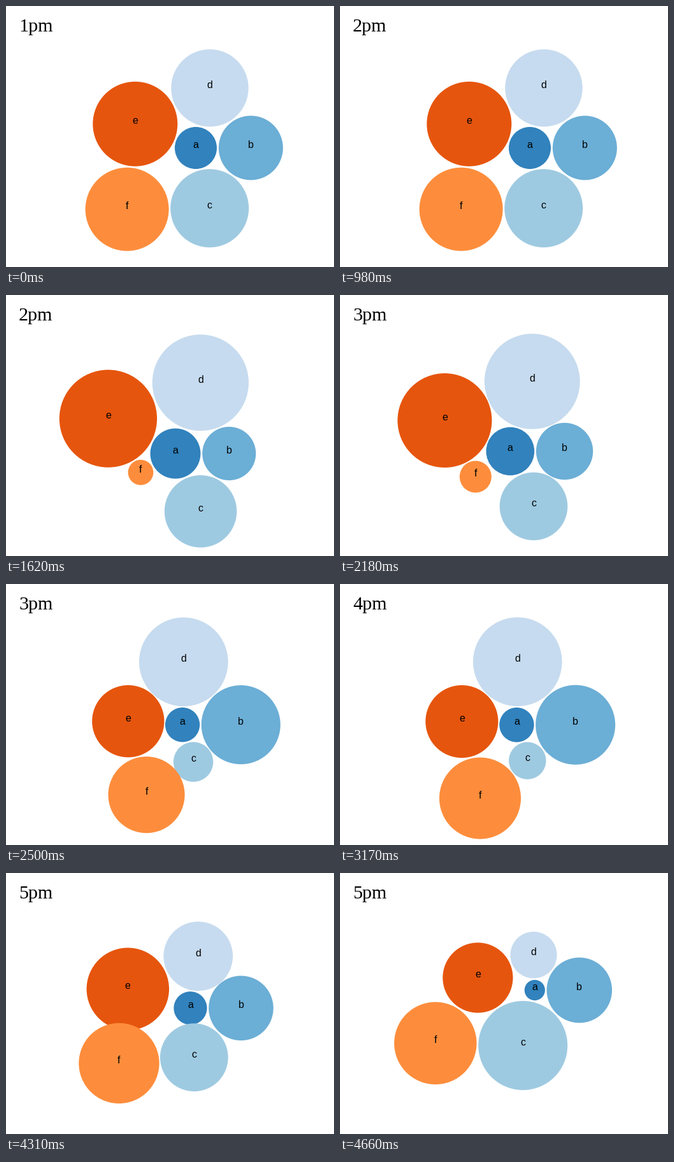
Write a matplotlib script that moves like this. It is 515 px wide and 410 px high and loops after 5330 ms.

```python
import matplotlib.pyplot as plt
from matplotlib.animation import FuncAnimation
from matplotlib.patches import Circle

W, H, DPI = 515, 410, 64
LOOP, TICK = 5330, 10       # ms
EASE_MS, LEAD_MS = 750, 33  # tween length, time already run at its first step
STEPS = 28

NAMES = "abcdef"
COLORS = ["#3182bd", "#6baed6", "#9ecae1", "#c6dbef", "#e6550d", "#fd8d3c"]
HOURS = ["1pm", "2pm", "3pm", "4pm", "5pm"]

# (x, y, radius) of every bubble, hour by hour
LAYOUTS = [
    [(298, 223, 33), (384.4, 222.9, 50.5), (319.7, 317.7, 61.5),
     (320, 128.8, 60.7), (202.8, 185.3, 66.5), (190.1, 319.3, 65.5)],
    [(265.8, 249.2, 39.5), (350.1, 249.2, 42), (305.5, 340, 56.7),
     (305.3, 137.8, 75.7), (160.2, 194.2, 76.7), (211.6, 278.5, 19.6)],
    [(278.3, 218.1, 25.8), (370.8, 218.1, 64.2), (292.9, 273, 28.5),
     (276, 120.7, 69.2), (195.2, 217.9, 54.5), (221.5, 336.8, 64.4)],
    [(271, 244.3, 37.4), (361.3, 244.2, 50.2), (304.6, 310.8, 34.5),
     (299.2, 133, 74.5), (162.8, 202.3, 75.7), (208.8, 334.6, 61.4)],
    [(305.8, 184, 16.1), (375.8, 184.1, 51.3), (287.2, 271, 70),
     (304, 128.8, 36.6), (216.4, 164.5, 55.1), (149.8, 267.4, 64.7)],
]
# start and end of the move to each next hour, in ms
MOVES = [(980, 1690), (1980, 2680), (2970, 3670), (3960, 4660)]


def px(size):
    return size * 72 / DPI


def ease(u):
    return 4 * u**3 if u < 0.5 else 1 - 4 * (1 - u)**3


def state(t):
    """Hour index and progress towards its layout at time t."""
    for hour in range(len(MOVES), 0, -1):
        start, end = MOVES[hour - 1]
        if t >= start:
            step = (end - start) / STEPS
            k = int((t - start) / step + 1e-6)
            if k >= STEPS:
                return hour, 1
            return hour, ease((LEAD_MS + k * step) / EASE_MS)
    return 0, 1


fig = plt.figure(figsize=(W / DPI, H / DPI), dpi=DPI, facecolor="white")
ax = fig.add_axes([0, 0, 1, 1])
ax.set_xlim(0, W)
ax.set_ylim(H, 0)
ax.axis("off")

title = ax.text(20, 40, HOURS[0], family="Liberation Serif", size=px(30),
                color="black", va="baseline")
bubbles, labels = [], []
for i, (name, color) in enumerate(zip(NAMES, COLORS)):
    x, y, r = LAYOUTS[0][i]
    bubbles.append(ax.add_patch(Circle((x, y), r, fc=color, lw=0, zorder=2 * i)))
    labels.append(ax.text(x, y, name, family="Liberation Sans", size=px(16),
                          color="black", ha="center", va="baseline",
                          zorder=2 * i + 1))


def draw(frame):
    hour, p = state(frame * TICK)
    title.set_text(HOURS[hour])
    pairs = zip(LAYOUTS[max(hour - 1, 0)], LAYOUTS[hour])
    for bubble, label, (old, new) in zip(bubbles, labels, pairs):
        x, y, r = (a + (b - a) * p for a, b in zip(old, new))
        bubble.center = x, y
        bubble.radius = r
        label.set_position((x, y))
    return [title, *bubbles, *labels]


anim = FuncAnimation(fig, draw, frames=LOOP // TICK, interval=TICK,
                     repeat=True, repeat_delay=0)
plt.show()
```
